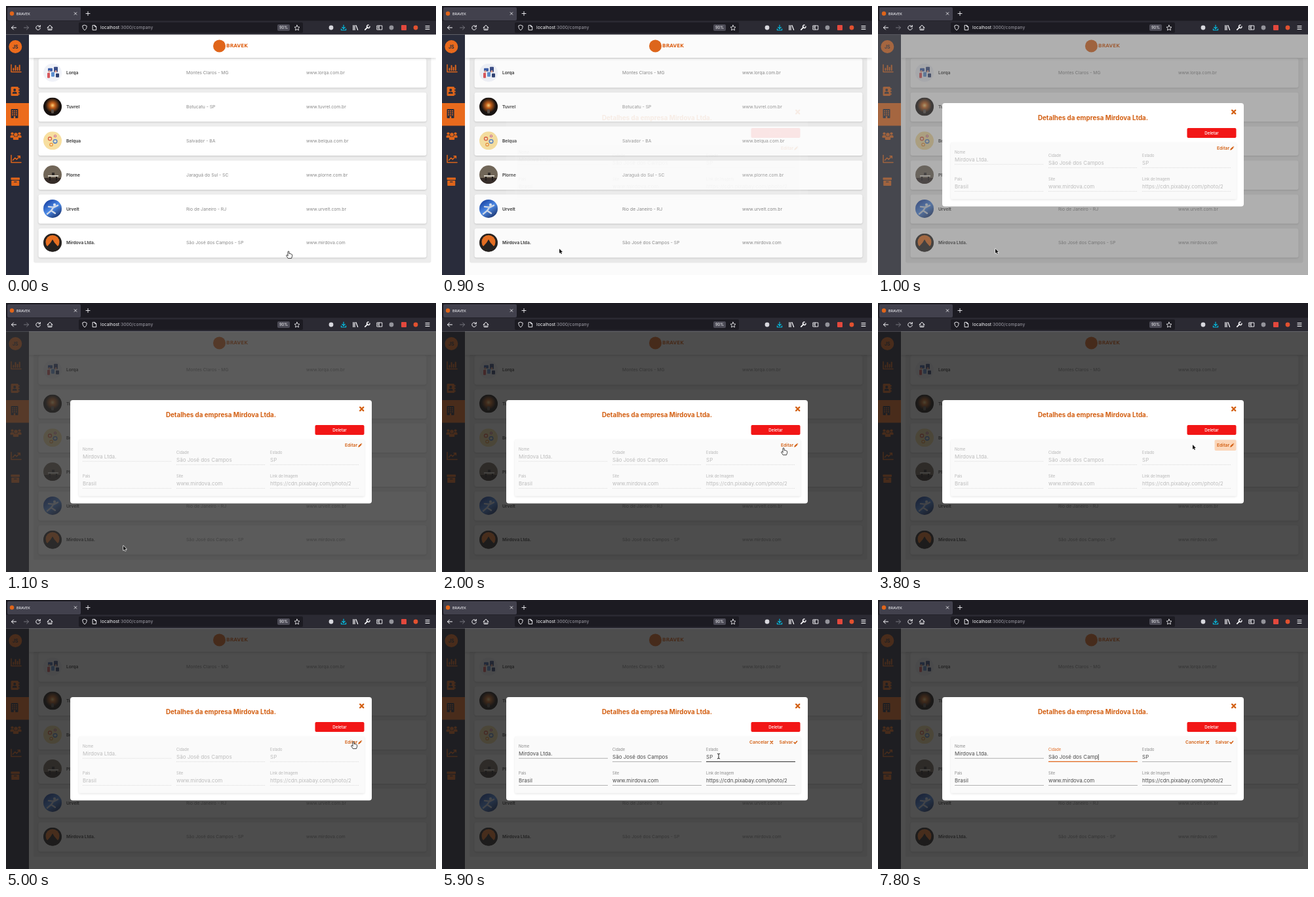
These frames come from a looping animation (656x410 px, 8 s). An HTML page with a canvas:

```html
<!DOCTYPE html>
<html lang="pt-BR">
<head>
<meta charset="utf-8">
<title>Empresas</title>
<style>
  html, body { margin: 0; width: 100%; height: 100%; overflow: hidden; background: #fff; }
  canvas { display: block; width: 656px; height: 410px; }
</style>
</head>
<body>
<canvas id="stage" width="656" height="410"></canvas>
<script>
const ctx = document.getElementById('stage').getContext('2d');
const LOOP = 8000;
const ORANGE = '#e0651a', DEEP = '#d35f12', NAVY = '#282b3a', INK = '#fbfbfe';
const SANS = 'Inter, "Open Sans", sans-serif';
const BRAND = 'BRAVEK';
const COMPANY = 'Mirdova Ltda.';
const ROWS = [
  ['Lorqa', 'Montes Claros - MG', 'www.lorqa.com.br'],
  ['Tuvrel', 'Botucatu - SP', 'www.tuvrel.com.br'],
  ['Belqua', 'Salvador - BA', 'www.belqua.com.br'],
  ['Plorne', 'Jaraguá do Sul - SC', 'www.plorne.com.br'],
  ['Urvelt', 'Rio de Janeiro - RJ', 'www.urvelt.com.br'],
  [COMPANY, 'São José dos Campos - SP', 'www.mirdova.com'],
];

// Timing
const CLICK_ROW = 880, EDIT_1 = 2600, CANCEL = 3500, EDIT_2 = 5300, FOCUS = 6600, TYPE = 7700;
// time, x, y of the pointer tip
const PATH = [
  [200, 431, 374], [700, 179, 370], [1500, 179, 370], [1700, 481, 214], [1850, 481, 214],
  [2000, 521, 221], [2100, 521, 221], [2400, 531, 217], [2650, 531, 217], [2850, 523, 216],
  [3000, 523, 216], [3400, 480, 216], [4600, 480, 216], [5000, 530, 216], [5400, 530, 216],
  [5850, 422, 238], [5950, 422, 238], [6180, 385, 237], [6600, 334, 240],
];

const clamp = v => Math.max(0, Math.min(1, v));
const smooth = v => { v = clamp(v); return v * v * (3 - 2 * v); };
const ramp = (t, start, length) => smooth((t - start) / length);

function box(x, y, w, h, color, r = 0) {
  ctx.fillStyle = color;
  ctx.beginPath();
  ctx.roundRect(x, y, w, h, r);
  ctx.fill();
}
function disc(x, y, r, color) {
  ctx.fillStyle = color;
  ctx.beginPath();
  ctx.arc(x, y, r, 0, 7);
  ctx.fill();
}
function text(s, x, y, size, color, weight = 400, align = 'left', family = SANS) {
  ctx.font = `${weight} ${size}px ${family}`;
  ctx.textAlign = align;
  ctx.fillStyle = color;
  ctx.fillText(s, x, y + size * 0.36);
}
function stroke(x, y, d, color = INK, width = 1) {
  ctx.save();
  ctx.translate(x, y);
  ctx.strokeStyle = color;
  ctx.lineWidth = width;
  ctx.lineCap = ctx.lineJoin = 'round';
  ctx.stroke(new Path2D(d));
  ctx.restore();
}
function fill(x, y, d, color) {
  ctx.save();
  ctx.translate(x, y);
  ctx.fillStyle = color;
  ctx.fill(new Path2D(d));
  ctx.restore();
}
function withShadow(color, blur, dy, draw) {
  ctx.save();
  ctx.shadowColor = color;
  ctx.shadowBlur = blur;
  ctx.shadowOffsetY = dy;
  draw();
  ctx.restore();
}
function withAlpha(alpha, draw) {
  if (alpha <= 0) return;
  ctx.save();
  ctx.globalAlpha *= alpha;
  draw();
  ctx.restore();
}

function drawBrowser() {
  box(0, 0, 656, 23, '#1c1b22');
  box(2, 2, 112, 20, '#42414d', 2);
  disc(9, 11.5, 3.2, ORANGE);
  text(BRAND, 16, 11.7, 5.4, INK);
  stroke(106, 11.5, 'M-1.8-1.8L1.8 1.8M1.8-1.8L-1.8 1.8', INK, .8);
  stroke(125, 11.5, 'M-3 0H3M0-3V3', INK, .9);

  box(0, 22.5, 656, 21, '#2b2a33');
  box(111, 25, 342, 16, '#1c1b22', 2);
  stroke(12, 33, 'M3.5 0H-3.5M-.5-3L-3.5 0L-.5 3');
  stroke(31, 33, 'M-3.5 0H3.5M.5-3L3.5 0L.5 3', '#77767f');
  stroke(49, 33, 'M2.6-2A3.3 3.3 0 1 0 3.3.8M3.3-3.6V-1.2H.8');
  stroke(67, 33, 'M-4 0L0-3.7L4 0M-2.8-.6V3.5H2.8V-.6M0 3.5V1');
  stroke(120, 33, 'M0-3.8L3.2-2.6C3.2.8 2 2.8 0 3.9C-2 2.8-3.2.8-3.2-2.6Z', INK, .9);
  stroke(135, 33, 'M-2.5-3.6H.6L2.7-1.5V3.6H-2.5ZM.5-3.5V-1.4H2.6', INK, .9);
  text('localhost', 144, 33, 6.8, INK);
  const hostWidth = ctx.measureText('localhost').width;
  text(':3000/company', 144 + hostWidth, 33, 6.8, '#a09fa8');
  box(414, 28, 19, 10, '#4b4a55', 2);
  text('90%', 423.5, 33, 5.8, INK, 400, 'center');
  stroke(444, 33.2, 'M0-4L1.2-1.3L4-1L1.9 1L2.5 3.8L0 2.4L-2.5 3.8L-1.9 1L-4-1L-1.2-1.3Z', INK, .8);

  disc(496, 33, 3.4, '#d8d8de');
  stroke(515, 33, 'M0-4V1.5M-2.3-.7L0 1.6L2.3-.7M-3.6 1.8V3.7H3.6V1.8', '#00c8ee', 1.1);
  stroke(533, 33, 'M-3.2-3.5V3.5M-1-3.5V3.5M1-3.5L3.6 3.5', INK, 1.2);
  stroke(551, 33, 'M-3.2 3.2L.8-.8', INK, 1.7);
  stroke(552, 32, 'M1-3A2.3 2.3 0 1 0 3-.8', INK, 1.4);
  stroke(570, 33, 'M-3.8-3H3.8V3H-3.8ZM-.8-3V3M-2.8-1.2H-1.8M-2.8.5H-1.8', INK, .9);
  disc(588, 33, 3.4, '#94949b');
  box(603, 29, 8, 8, '#e2483d', 1);
  disc(625, 33, 3.4, '#e2512f');
  stroke(643, 33, 'M-3-2.5H3M-3 0H3M-3 2.5H3', INK, 1);
}

function drawSidebar() {
  box(0, 43.5, 35, 366.5, NAVY);
  box(0, 148, 35, 34.5, '#ec6b1c');
  disc(14.3, 62, 10, '#ec6b1c');
  text('JS', 14.3, 62, 7, NAVY, 700, 'center');
  stroke(15, 95, 'M-7-5.5V5.5H8', ORANGE, 1.5);
  stroke(15, 95, 'M-3.6 2.7V.2M-.5 2.7V-4M2.6 2.7V-1.2M5.7 2.7V-4.5', ORANGE, 2);
  box(7.5, 123, 11.5, 14, ORANGE, 1.5);
  for (const y of [125, 129, 133]) box(19.2, y, 1.4, 2.6, ORANGE);
  disc(13.2, 128, 2, NAVY);
  box(9.8, 130.8, 6.8, 3, NAVY, [2, 2, 0, 0]);
  box(7.5, 157, 11, 14, NAVY, 1);
  for (let i = 0; i < 9; i++) box(9.2 + i % 3 * 2.9, 159 + (i / 3 | 0) * 3, 1.7, 1.7, '#ec6b1c');
  box(11.8, 168, 2.4, 3, '#ec6b1c');
  for (const [x, y, r] of [[9.5, 194.5, 2.1], [20.5, 194.5, 2.1], [15, 196, 2.8]]) {
    disc(x, y, r, ORANGE);
    box(x - r * 1.5, y + r + .5, r * 3, r * 1.7, ORANGE, [r, r, 1, 1]);
  }
  stroke(15, 233, 'M-7-5.5V5.5H8', ORANGE, 1.5);
  stroke(15, 233, 'M-4.5 2L-1.2-1.5L1.3.8L6-4M3-4.2H6.3V-1.2', ORANGE, 1.6);
  box(7.5, 261.5, 13.5, 3.6, ORANGE, .8);
  box(8.2, 266, 12, 8, ORANGE, .8);
  box(12, 267.5, 4.5, 1.3, NAVY, .6);
}

// Simple pictures, drawn around 0,0 inside a round clip of radius 14
const PICTURES = [
  () => {
    box(-14, -14, 28, 28, '#f0f2f8');
    box(-7, -7, 7, 5, '#3d5ea8', 1); box(2, -9, 6, 8, '#3a4d86', 1);
    box(-8, 0, 4, 8, '#d9575c', 1); box(-2, -1, 5, 7, '#5c8fd0', 1); box(5, 1, 5, 6, '#2f4173', 1);
    disc(-5, -2, 1.6, '#e9a58f'); disc(5, -2, 1.6, '#e9a58f');
  },
  () => {
    const glow = ctx.createRadialGradient(0, -2, 0, 0, -2, 11);
    glow.addColorStop(0, '#ffd27a'); glow.addColorStop(.35, '#c5611c'); glow.addColorStop(1, '#17110f');
    box(-14, -14, 28, 28, glow);
    box(-2, 4, 4, 6, '#5a5049', 1);
  },
  () => {
    box(-14, -14, 28, 28, '#f7dfa0');
    for (const [x, y, r, c] of [[-4, -3, 3.2, '#db6a4c'], [4, 1, 3.6, '#6b8fc0'], [-2, 6, 2.8, '#e8963d'], [4, -7, 2, '#c8618a']]) {
      disc(x, y, r, c); disc(x, y, r * .5, '#f9ecc8');
    }
  },
  () => {
    box(-14, -14, 28, 28, '#716658');
    box(-14, 5, 28, 9, '#352c28');
    box(-7, 1, 16, 2, '#d9d3c8'); box(-5, 3, 2, 6, '#1f1b1a'); box(5, 3, 2, 6, '#1f1b1a');
    box(-1, -3, 4, 4, '#2e2927');
  },
  () => {
    const sky = ctx.createLinearGradient(-10, -14, 10, 14);
    sky.addColorStop(0, '#123a9c'); sky.addColorStop(.5, '#4d8be8'); sky.addColorStop(1, '#142a63');
    box(-14, -14, 28, 28, sky);
    disc(3, -6, 2.1, '#d8e4f4');
    stroke(0, 0, 'M2-3L-2 3L-8 8M-2 3L4 7M-6-3L2-2L8-5', '#d0d9e8', 2.4);
  },
  () => {
    box(-14, -14, 28, 28, '#25211f');
    disc(0, -1, 10.5, '#e66f21');
    fill(0, 0, 'M0-5L3 0L12 10V14H-12V10L-3 0Z', '#25211f');
  },
];

function drawPage() {
  box(35, 43.5, 621, 366.5, '#fff');
  box(42, 60, 606.5, 331.5, '#ededed', 3);
  ROWS.forEach(([name, city, site], i) => {
    const y = 102 + i * 51.8;
    withShadow('rgba(0,0,0,.16)', 2.5, 1, () => box(49.5, y - 22, 592, 44.5, '#fff', 3));
    ctx.save();
    ctx.translate(71, y - .3);
    ctx.beginPath();
    ctx.arc(0, 0, 14, 0, 7);
    ctx.clip();
    PICTURES[i]();
    ctx.restore();
    text(name, 92, y, 6.6, '#444', 700);
    text(city, 275, y, 6.8, '#888');
    text(site, 458, y, 6.8, '#888');
  });
  withShadow('rgba(0,0,0,.18)', 4, 1, () => box(35, 43.5, 621, 35.5, '#fff'));
  disc(325.5, 61, 9.5, ORANGE);
  text(BRAND, 336, 60.5, 7.4, ORANGE, 700, 'left', '"DejaVu Sans", sans-serif');
  drawSidebar();
}

// The backdrop fades in as a mid grey and settles to a dark one
function drawBackdrop(t) {
  const settle = 1 - clamp((t - 1000) / 200);
  const grey = Math.round(27 + 73 * settle * settle);
  withAlpha(.78 * ramp(t, CLICK_ROW, 200), () => box(0, 43.5, 656, 366.5, `rgb(${grey},${grey},${grey})`));
}

function drawField(label, value, x, y, state) {
  const { editing, hover = 0, focus = 0, caret = false } = state;
  const shade = (from, to) => `rgb(${Array(3).fill(Math.round(from + (to - from) * editing))})`;
  text(label, x, y, 5.7, focus > .5 ? ORANGE : shade(180, 135));
  ctx.save();
  ctx.beginPath();
  ctx.rect(x, y + 4, 123, 14);
  ctx.clip();
  text(value, x, y + 11.3, 8, shade(188, 75));
  ctx.restore();
  ctx.save();
  if (editing < .5) ctx.setLineDash([1, 1]);
  ctx.strokeStyle = hover > .5 ? '#333' : shade(212, 160);
  ctx.lineWidth = hover > .5 ? 1 : .8;
  ctx.beginPath();
  ctx.moveTo(x, y + 18.5);
  ctx.lineTo(x + 136, y + 18.5);
  ctx.stroke();
  ctx.restore();
  if (focus > 0) box(x + 68 - 68 * focus, y + 17.8, 136 * focus, 1.3, ORANGE);
  if (caret) {
    ctx.font = `400 8px ${SANS}`;
    box(x + ctx.measureText('São José dos Camp').width + .2, y + 7, .8, 9, '#333');
  }
}

function drawModal(t) {
  const isEditing = (t >= EDIT_1 && t < CANCEL) || t >= EDIT_2;
  const editing = t < CANCEL ? ramp(t, EDIT_1, 200)
    : t < EDIT_2 ? 1 - ramp(t, CANCEL, 200) : ramp(t, EDIT_2, 200);

  box(98, 148, 460, 157.5, '#fff', 4);
  text(`Detalhes da empresa ${COMPANY}`, 328, 170, 9.8, DEEP, 700, 'center');
  stroke(542.7, 161.5, 'M-2.6-2.6L2.6 2.6M2.6-2.6L-2.6 2.6', DEEP, 2.2);
  box(471.5, 186, 75, 15, '#f21616', 2);
  text('Deletar', 509, 193.5, 6.2, '#fff', 500, 'center');
  withShadow('rgba(0,0,0,.1)', 3, 1, () => box(111, 208, 436, 86.5, '#fafafa', 2));

  if (isEditing) {
    const glow = t < CANCEL ? 1 - ramp(t, 2900, 400) : 1 - ramp(t, EDIT_2, 400);
    withAlpha(glow * .1, () => {
      box(466, 208.5, 42.5, 16.5, '#f0700f', 2);
      box(511, 208.5, 35.5, 16.5, '#f0700f', 2);
    });
    text('Cancelar', 469, 216.8, 6.8, DEEP, 600);
    stroke(502.8, 217, 'M-1.7-1.7L1.7 1.7M1.7-1.7L-1.7 1.7', DEEP, 1.5);
    text('Salvar', 514.5, 216.8, 6.8, DEEP, 600);
    stroke(539.3, 217, 'M-2.3 0L-.7 1.7L2.3-1.7', DEEP, 1.5);
  } else {
    if (t >= CANCEL && t < 4200) box(513.5, 208.5, 33, 16.5, '#fbd6b9', 2);
    text('Editar', 517, 216.8, 6.8, DEEP, 600);
    fill(540, 217, 'M-2.8 2.8L-2.3.7L1-2.6L2.6-1L-.7 2.3ZM1.4-3L2-3.4L3.4-2L3-1.4Z', DEEP);
  }

  const cityEnd = t < TYPE ? 'os' : t < TYPE + 100 ? 's' : '';
  const blinkOn = t < TYPE ? (t - FOCUS) % 1000 < 500 && t < 7200 : true;
  drawField('Nome', COMPANY, 117, 222.8, { editing });
  drawField('Cidade', 'São José dos Camp' + cityEnd, 260, 228, {
    editing, hover: t > 6150 && t < FOCUS ? 1 : 0,
    focus: ramp(t, FOCUS, 200), caret: t >= FOCUS && blinkOn,
  });
  drawField('Estado', 'SP', 403, 228, { editing, hover: t > 5700 && t < 6080 ? 1 : 0 });
  drawField('País', 'Brasil', 117, 264, { editing });
  drawField('Site', 'www.mirdova.com', 260, 264, { editing });
  drawField('Link de Imagem', 'https://cdn.pixabay.com/photo/2', 403, 264, { editing });
}

function pointerAt(t) {
  const next = PATH.findIndex(p => p[0] > t);
  if (next === 0) return PATH[0].slice(1);
  if (next < 0) return PATH.at(-1).slice(1);
  const [t0, x0, y0] = PATH[next - 1], [t1, x1, y1] = PATH[next];
  const k = smooth((t - t0) / (t1 - t0));
  return [x0 + (x1 - x0) * k, y0 + (y1 - y0) * k];
}

function drawPointer(t) {
  if (t >= TYPE) return;
  const [x, y] = pointerAt(t);
  const onButton = x > 513 || (t > EDIT_1 && t < CANCEL);
  if (t < CLICK_ROW || (t > 1900 && onButton)) {
    const hand = 'M-1 5V.4Q0-.8 1 .4V3.5Q2.2 2.8 2.8 3.8Q4 3.3 4.4 4.4Q5.6 4.2 5.6 5.6V7.4L4.5 10.6H-.7L-3 7.3Q-3.7 5.6-2.3 5.4L-1 6.5Z';
    fill(x, y, hand, '#fff');
    stroke(x, y, hand, '#111', .8);
  } else if (t > 5650 && (x > 403 || x < 396)) {
    stroke(x, y, 'M-1.7-3.8Q0-3.8 0-2.8Q0-3.8 1.7-3.8M0-2.8V2.8M-1.7 3.8Q0 3.8 0 2.8Q0 3.8 1.7 3.8', '#111', .9);
  } else {
    const arrow = 'M0 0V7L1.6 5.6L2.7 8L3.9 7.5L2.8 5.1H5Z';
    stroke(x, y, arrow, '#fff', 1.2);
    fill(x, y, arrow, '#111');
  }
}

function render(now) {
  const t = now % LOOP;
  ctx.clearRect(0, 0, 656, 410);
  drawPage();
  drawBackdrop(t);
  drawBrowser();
  withAlpha(ramp(t, CLICK_ROW, 110), () => drawModal(t));
  drawPointer(t);
}

const start = performance.now();
function tick() {
  render(performance.now() - start);
  requestAnimationFrame(tick);
}
tick();
</script>
</body>
</html>
```
